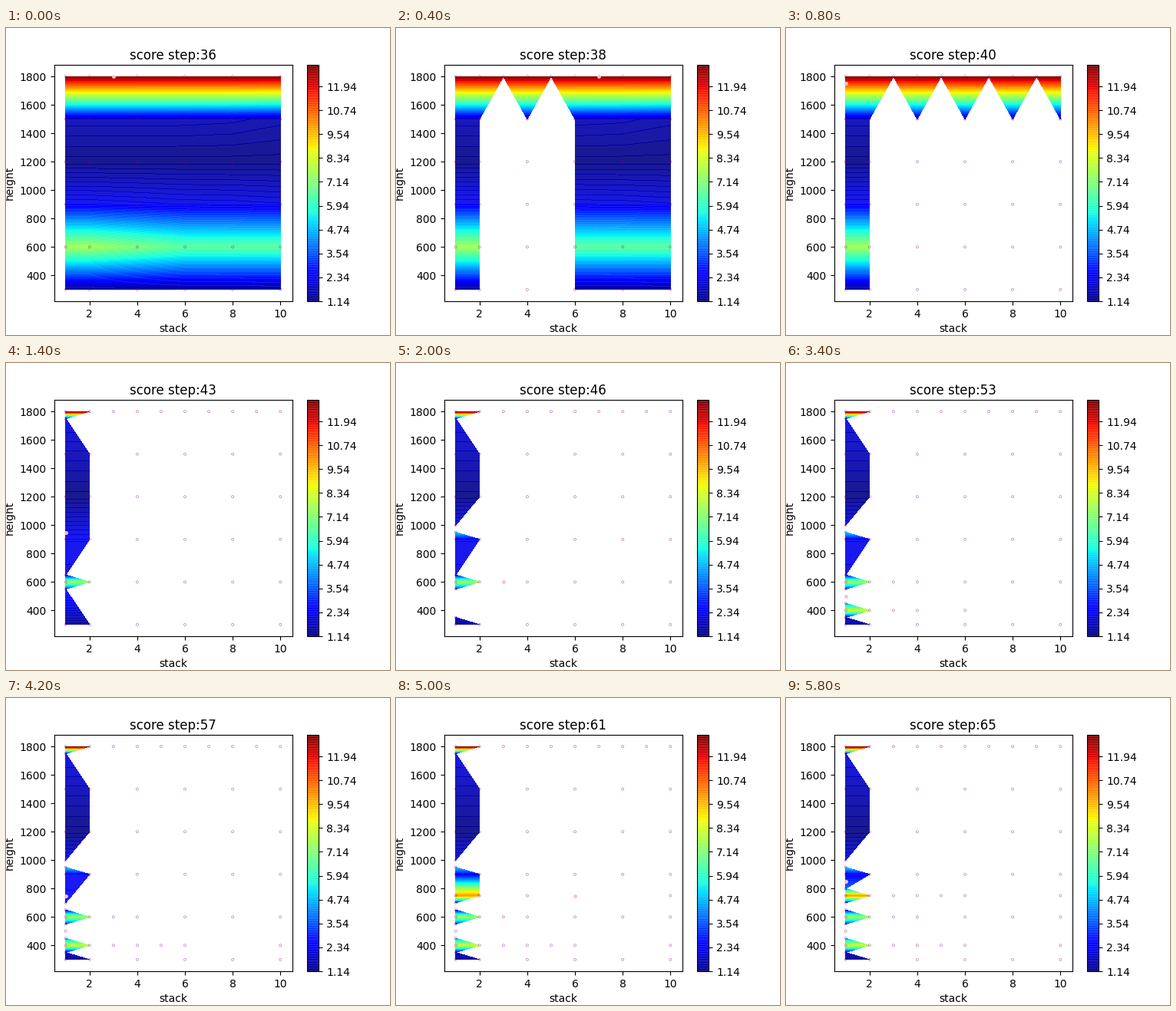
A matplotlib script for the animation above (6 s loop, 500 by 400 pixels).

```python
import numpy as np
import matplotlib.pyplot as plt
from matplotlib.animation import FuncAnimation

START, FRAMES, INTERVAL = 36, 30, 200
LEVELS = 1.14 + 0.12 * np.arange(100)
PEAKS = {412: 7.6, 595: 6.5, 755: 8.8, 948: 3.7}  # height: strength


def bump(h, center):
    return np.exp(-((h - center) / 28) ** 2 / 2)


def score(s, h):
    """Narrow peaks over a gentle ripple, fading towards high stacks."""
    fade = 1 - 0.04 * np.clip(s - 2, 0, 4)
    ripple = h / 3000 * np.sin(np.pi * h / 600) ** 2 * (1 - 0.3 * (s / 10) ** 6)
    peaks = sum(a * bump(h, c) for c, a in PEAKS.items())
    return 1.2 + ripple + fade * peaks + 13.55 * bump(h, 1815)


def row(height, *stacks):
    return [(s, height) for s in stacks]


def column(*heights):
    return [(1, h) for h in heights]


# Coarse grid first, then one probe per step
samples = [p for h in range(300, 1801, 300) for p in row(h, 1, 2, 4, 6, 8, 10)]
samples += row(1800, 3, 5, 7, 9) + column(1750, 650, 550, 950, 1000, 350)
samples += row(600, 3) + row(400, 1, 2, 4, 6, 3) + column(450, 500)
samples += row(400, 5, 10) + column(700)
samples += row(750, 1, 2, 4, 10, 6, 3, 5) + column(800, 850)


def pivot(points):
    """Score table over all seen stacks and heights, gaps masked."""
    s, h = np.array(points, float).T
    xs, col = np.unique(s, return_inverse=True)
    ys, line = np.unique(h, return_inverse=True)
    table = np.full((len(ys), len(xs)), np.nan)
    table[line, col] = score(s, h)
    return xs, ys, np.ma.masked_invalid(table)


def draw_surface(count):
    return ax.contourf(*pivot(samples[:count]), levels=LEVELS, cmap="jet", alpha=0.9)


fig, ax = plt.subplots(figsize=(5, 4), dpi=100)
ax.set_xlim(0.51, 10.49)
ax.set_ylim(218, 1882)
ax.set_xlabel("stack")
ax.set_ylabel("height")
title = ax.set_title("", pad=5.3)

surface = draw_surface(START)
bar = fig.colorbar(surface, ax=ax, ticks=LEVELS[::10], format="%.2f")
bar.solids.set(edgecolor="face", linewidth=0.7)
seen = ax.scatter([], [], s=5, facecolors="none", edgecolors="purple",
                  linewidths=0.5, alpha=0.5, zorder=3)
newest = ax.scatter([], [], s=9, color="pink", linewidths=0.5, zorder=4)


def update(i):
    global surface
    step = START + i
    surface.remove()
    surface = draw_surface(step)
    seen.set_offsets(samples[:step])
    newest.set_offsets(samples[step:step + 1])
    title.set_text(f"score step:{step}")
    return surface, seen, newest, title


anim = FuncAnimation(fig, update, frames=FRAMES, interval=INTERVAL,
                     init_func=lambda: update(0), repeat=True, repeat_delay=0)
plt.show()
```
